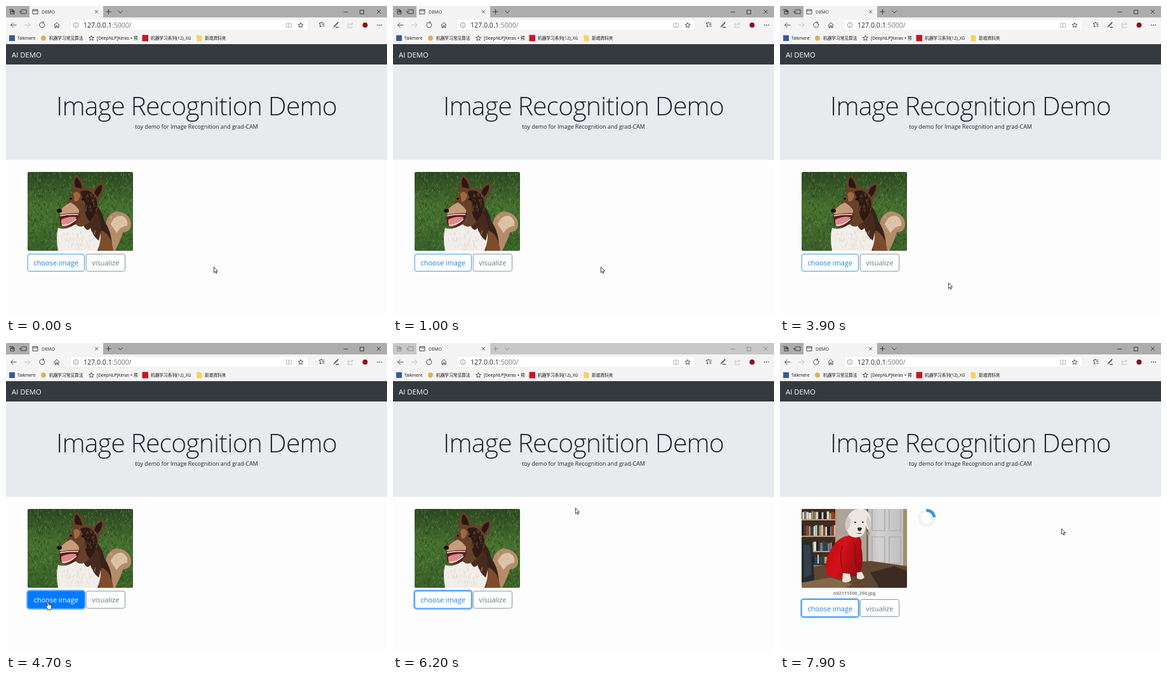
An HTML page for the animation above (8 s loop, 600 by 486 pixels).

```html
<!DOCTYPE html>
<html lang="en">
<head>
<meta charset="utf-8">
<title>DEMO</title>
<style>
  html, body { margin: 0; width: 100%; height: 100%; overflow: hidden; background: #fff; }
  svg { display: block; }
  text { font-family: "Open Sans", "Noto Sans", "Noto Sans CJK SC", sans-serif; fill: #212529; }
  .line { fill: none; stroke: #222; stroke-width: .8; }
  .marks text { font-size: 6.7px; fill: #111; }
  .btn text { font-size: 10.95px; }
  .hide { display: none; }
</style>
</head>
<body>
<svg width="600" height="486" viewBox="0 0 600 486">
  <defs>
    <clipPath id="frame"><rect width="166" height="124" rx="2.5"/></clipPath>
    <linearGradient id="lawn" x2="0" y2="1">
      <stop stop-color="#2c4822"/><stop offset=".45" stop-color="#46702f"/><stop offset="1" stop-color="#395f28"/>
    </linearGradient>
    <linearGradient id="door" x2="1">
      <stop stop-color="#b9b6b2"/><stop offset=".3" stop-color="#d3d2d2"/><stop offset="1" stop-color="#bdbbbb"/>
    </linearGradient>
    <linearGradient id="coat" x2="1" y2=".4">
      <stop stop-color="#b80b12"/><stop offset=".5" stop-color="#d3121a"/><stop offset="1" stop-color="#9c0a10"/>
    </linearGradient>
    <path id="star" d="M0-4 1.1-1.3 4-1.1 1.8.8 2.5 3.7 0 2.1-2.5 3.7-1.8.8-4-1.1-1.1-1.3Z"/>
  </defs>

  <!-- tab strip -->
  <rect id="strip" width="600" height="18.5" fill="#adadad"/>
  <path d="M37 0H153V19H37Z" fill="#f4f4f4"/>
  <g id="caption" class="line">
    <path d="M5.5 6.5V5.5H11V11M7 7.5H13V12.5H7ZM7 9H13"/>
    <path d="M23.5 6H32V12H23.5V10.5M26 9H21.5M23.3 7.3 21.5 9 23.3 10.7"/>
    <path d="M157.5 9H165.500M161.500 5V13M176.500 7.500 180 11 183.500 7.500"/>
    <path d="M531.500 9.500H538.500M557.500 6.500H563.500V12.500H557.500ZM584 6 590 12M590 6 584 12"/>
  </g>
  <path class="line" d="M42 5.500H50V12.500H42ZM42 7.500H50M140 6.500 145 11.500M145 6.500 140 11.500"/>
  <text x="56" y="11.700" font-size="7.100">DEMO</text>

  <!-- toolbar -->
  <rect y="18" width="600" height="42" fill="#f4f4f4"/>
  <rect x="101" y="21" width="375" height="17.500" fill="#fff" stroke="#e2e2e2" stroke-width=".6"/>
  <g class="line">
    <path d="M16.500 30H7.500M11.500 26 7.500 30 11.500 34"/>
    <path d="M29 30H38M34 26 38 30 34 34" stroke="#b5b5b5"/>
    <path d="M60 27.500A4 4 0 1 1 56 26H59.500M57.500 24 59.700 26 57.500 28"/>
    <path d="M76 30 80 26 84 30M77 29.500V34H79V31H81V34H83V29.500"/>
    <g stroke="#777"><circle cx="110" cy="30" r="3.800"/><path d="M110 29.500V32M110 27.700V28.500"/></g>
    <path d="M441.500 27H445.500V33.500H441.500ZM445.500 27H449.500V33.500H445.500Z" stroke="#aaa"/>
    <use href="#star" x="464" y="30"/>
    <path d="M493 27 495.500 27 496.500 25 497.500 27H501.500M493 27 495 29 494.500 33 497 31.500M498 29.500H501.500M498.500 32H501.500"/>
    <path d="M516 33.500Q518 29 523 25.500 523 28 518 32M519 33.500H524" stroke-width="1"/>
    <path d="M541 28H538.500V34H545V32M540.500 31Q541.500 28 546 28M544 26 546.300 28 544 30" stroke="#b5b5b5"/>
  </g>
  <circle cx="565.500" cy="30" r="4" fill="#8a1119"/>
  <path d="M584.500 30H592" stroke="#222" stroke-width="1.300" stroke-dasharray="1.300 1.700"/>
  <text x="122" y="33.500" font-size="10.600" fill="#111">127.0.0.1<tspan fill="#777">:5000/</tspan></text>

  <!-- bookmarks -->
  <g class="marks">
    <rect x="5" y="46" width="9" height="9" fill="#3b5998"/>
    <text x="18" y="53">Talkmere</text>
    <circle cx="59" cy="50.500" r="4" fill="#d8b25c"/>
    <text x="68" y="53">机器学习常见算法</text>
    <use href="#star" x="134.500" y="50.500" class="line"/>
    <text x="143" y="53">[DeepNLP]Keras + 预</text>
    <rect x="214.500" y="45.500" width="9.500" height="10" fill="#c81623"/>
    <text x="228" y="53">机器学习系列(12)_XG</text>
    <path d="M300.500 45.500H304L305 46.500H308.500V55.500H300.500Z" fill="#f6d264"/>
    <text x="313" y="53" style="font-family:'Noto Sans CJK TC','Noto Sans CJK SC',sans-serif">新增資料夾</text>
  </g>

  <!-- page -->
  <rect y="60" width="600" height="32" fill="#343a40"/>
  <text x="9" y="80.500" font-size="11.300" style="fill:#fff">AI DEMO</text>
  <rect y="92" width="600" height="150" fill="#e9eaee"/>
  <text x="300" y="171.500" font-size="41" font-weight="300" letter-spacing="-.9" text-anchor="middle">Image Recognition Demo</text>
  <text x="300" y="193.300" font-size="8.900" text-anchor="middle">toy demo for Image Recognition and grad-CAM</text>
  <rect y="242" width="600" height="244" fill="#fefdfe"/>

  <g transform="translate(34 261)"><g clip-path="url(#frame)">
    <g id="lawnDog">
      <rect width="166" height="124" fill="url(#lawn)"/>
      <g id="grass"></g>
      <path d="M122 92Q122 66 140 62 160 64 163 80 164 94 150 95 146 108 138 124H118Z" fill="#b48c69"/>
      <path d="M131 82Q136 68 149 69 159 74 157 85 148 84 140 96Z" fill="#dcc5aa"/>
      <path d="M98 44Q116 54 121 78 134 96 133 124H56L70 80Z" fill="#38221a"/>
      <path d="M116 92Q132 98 135 124H112Z" fill="#7d4c2d"/>
      <path d="M48 88Q60 92 72 84 88 78 98 62 106 64 112 82 119 102 110 124H48Q44 102 48 88Z" fill="#f2eee9"/>
      <path d="M88 84Q100 78 103 64L110 66Q120 82 112 108 102 100 99 88 94 96 88 84Z" fill="#482a1d"/>
      <path d="M71 32Q68 16 76 4 86 10 90 25 97 24 103 29 108 17 120 17 123 31 112 42 112 64 98 78 86 90 78 84L60 70 48 66Q52 55 62 50 66 40 71 32Z" fill="#67402a"/>
      <path d="M75 24Q72 14 77 8 84 14 86 26ZM105 34Q108 22 117 20 119 30 109 40Z" fill="#2b1812"/>
      <path d="M83 31Q99 24 108 42 114 60 98 78 88 68 91 51Z" fill="#2c1a14"/>
      <path d="M49 64Q56 53 68 48 76 52 81 60 82 67 74 72L56 70Z" fill="#c79c79"/>
      <path d="M72 34Q78 28 83 36 82 46 74 47Z" fill="#a2683d"/>
      <path d="M50 68Q64 64 82 65 81 79 69 85 57 90 51 81Z" fill="#551e20"/>
      <path d="M53 75Q64 69 77 71 71 84 58 86 52 85 53 75Z" fill="#df8889"/>
      <path d="M51 69Q65 66 80 67M54 84Q67 84 77 74" fill="none" stroke="#f6ece5" stroke-width="1.700"/>
      <ellipse cx="50" cy="61" rx="4" ry="3.300" fill="#17110f"/>
      <ellipse cx="68" cy="42" rx="2" ry="1.600" fill="#140d0a"/>
      <ellipse cx="87" cy="43" rx="2.400" ry="1.700" fill="#140d0a"/>
      <g id="fur"></g>
    </g>
    <g id="roomDog" class="hide">
      <rect width="166" height="124" fill="#8d7b67"/>
      <path d="M54 0H106V92H54Z" fill="#aca49a"/>
      <path d="M102 0H166V92H102Z" fill="url(#door)"/>
      <path d="M111 0V34H131V0M138 0V34H156V0M111 44V84H131V44ZM138 44V86H156V44Z" fill="none" stroke="#a5a5a8" stroke-width="1.200"/>
      <path d="M160 0H166V96H160Z" fill="#a78c69"/>
      <path d="M102 0H105V84H102Z" fill="#77695a"/>
      <circle cx="105" cy="39" r="2.200" fill="#bb9752"/>
      <rect width="54" height="88" fill="#3e2b20"/>
      <g id="books"></g>
      <path d="M0 17H54M0 43H54M0 67H54" stroke="#bd9f80" stroke-width="2"/>
      <path d="M53 0H56V84H53Z" fill="#b79b7c"/>
      <path d="M0 94 60 84 110 82 166 90V124H0Z" fill="#604733"/>
      <path d="M0 50 17 52 20 112 0 117Z" fill="#232a30"/>
      <path d="M3 56 14 57 16 104 4 108Z" fill="#35404a"/>
      <path d="M108 100 145 90 166 97V124H122Z" fill="#3b2b22"/>
      <path d="M0 116 45 108 80 118 70 124H0Z" fill="#87674b"/>
      <path d="M74 42Q58 44 47 62 34 84 40 104 54 112 72 108L92 104Q99 80 94 60 96 48 90 43Z" fill="url(#coat)"/>
      <path d="M64 58Q58 82 68 106M84 56Q83 78 88 102" fill="none" stroke="#8d0a10" stroke-width="1.500"/>
      <path d="M65 101 76 102 78 112Q72 118 64 114ZM87 100 95 99 99 108Q94 113 87 109Z" fill="#ebe5dc"/>
      <path d="M73 11Q80-2 97 0 108 4 109 18 110 29 105 33 101 29 101 23 101 38 95 42 84 48 76 42 71 36 70 27Z" fill="#ece8e1"/>
      <path d="M73 11Q66 20 70 34 77 31 78 17ZM104 10Q111 20 108 33 103 29 102 19Z" fill="#d3cabe"/>
      <path d="M83 20H86V22H83ZM95 20H98V22H95ZM88 30Q91 28 95 30 94 35 91 35 88 34 88 30ZM86 38Q91 40 96 38" fill="#2b2625"/>
    </g>
  </g></g>

  <text id="file" class="hide" x="117" y="396" font-size="7.300" font-weight="700" text-anchor="middle" style="fill:#85868a">n02111500_250.jpg</text>
  <g id="spinner" class="hide" fill="none" stroke-width="4.700">
    <circle r="11.650" stroke="#f3f3f3"/>
    <path d="M-8.240-8.240A11.650 11.650 0 0 1 8.240-8.240" stroke="#3498db"/>
  </g>

  <g id="buttons" class="btn">
    <rect id="ring" class="hide" x="33" y="389" width="91.500" height="29.500" rx="4" fill="none" stroke="#80bdff" stroke-width="2"/>
    <rect id="choose" x="34.200" y="390.200" width="89.200" height="27" rx="3" fill="#fff" stroke="#2289d8" stroke-width=".9"/>
    <text id="label" x="78.800" y="408.300" text-anchor="middle">choose image</text>
    <rect x="126.200" y="390.200" width="61.300" height="27" rx="3" fill="#fff" stroke="#7d868d" stroke-width=".9"/>
    <text x="156.800" y="408.300" text-anchor="middle" style="fill:#6c757d">visualize</text>
  </g>

  <g id="cursor" fill="#fff" stroke="#111" stroke-width=".8" stroke-linejoin="round">
    <path id="arrow" d="M.4.4V9.400L2.400 7.500 3.700 10.600 5.100 10 3.800 7H6.600Z"/>
    <path id="hand" d="M-1 1V6.800L-2.400 5.900Q-3.400 6-3 7.200L-.6 11.200V12.600H5V11Q6 9 5.900 6.200 5.600 5.200 4.600 5.600 4.300 4.700 3.200 5 2.600 4.200 1.100 4.400V1Q0-.6-1 1Z"/>
  </g>
</svg>
<script>
const LOOP = 8000, STEP = 100;
const CLICK = 4600, DIALOG = 4800, LEAVE = 5800, PICKED = 7800;
const $ = id => document.getElementById(id);

let seed = 7;
const rnd = (a = 0, b = 1) => {
  seed = (seed * 16807) % 2147483647;
  return a + (b - a) * seed / 2147483647;
};

// Scatters short strokes of one colour over a box.
function strokes(host, color, count, [x0, y0, x1, y1], dx, dy, width = .7) {
  let d = '';
  for (let i = 0; i < count; i++) {
    d += `M${rnd(x0, x1).toFixed(1)} ${rnd(y0, y1).toFixed(1)}l${rnd(-dx, dx).toFixed(1)} ${rnd(-dy, -dy / 3).toFixed(1)}`;
  }
  host.insertAdjacentHTML('beforeend', `<path d="${d}" fill="none" stroke="${color}" stroke-width="${width}"/>`);
}

const lawn = [0, 0, 166, 126];
strokes($('grass'), '#213a19', 520, lawn, 3, 5);
strokes($('grass'), '#5f8d42', 430, lawn, 3, 5);
strokes($('grass'), '#83a95f', 150, [0, 25, 166, 126], 3, 4, .5);
strokes($('fur'), '#9b6845', 38, [91, 36, 108, 64], 1.5, 5, .5);
strokes($('fur'), '#d8d0c7', 60, [52, 96, 108, 124], 1.5, 7, .6);
strokes($('fur'), '#d2ad86', 30, [130, 72, 154, 90], 3, 4, .6);

const spines = ['#a33b2b', '#d6d0bd', '#2e4257', '#202024', '#b5a04c', '#777d82', '#e2dfd7'];
[[3, 16], [25, 42], [50, 66], [72, 86]].forEach(([top, base]) => {
  for (let x = 1; x < 52;) {
    const w = rnd(2, 4.5), y = top + rnd(0, 4);
    const color = spines[Math.floor(rnd(0, spines.length))];
    $('books').insertAdjacentHTML('beforeend',
      `<rect x="${x}" y="${y}" width="${w}" height="${base - y}" fill="${color}"/>`);
    x += w + .4;
  }
});

// Pointer positions: time, x, y
const path = [
  [0, 327, 410], [3600, 327, 410], [3800, 300, 426], [4000, 230, 444],
  [4200, 150, 448], [4400, 86, 425], [4500, 69, 410], [4600, 66, 407],
  [5700, 66, 407], [5900, 135, 352], [6100, 265, 272], [6200, 287, 259],
  [6400, 288, 257], [6600, 271, 246], [6900, 271, 246], [7100, 320, 262],
  [7400, 432, 289], [7500, 447, 291.500], [7700, 447, 291.500], [7800, 443, 291.500], [8000, 443, 291.500]
];

function pointAt(t) {
  const i = path.findIndex(p => p[0] > t);
  const [t0, x0, y0] = path[i - 1], [t1, x1, y1] = path[i];
  const k = (t - t0) / (t1 - t0);
  return [x0 + (x1 - x0) * k, y0 + (y1 - y0) * k];
}

const show = (id, on) => $(id).classList.toggle('hide', !on);

function render(t) {
  const hover = t >= 4500 && t < LEAVE;
  const active = t < DIALOG || t >= PICKED;
  const picked = t >= PICKED;
  const hand = hover || (t >= 7600 && t < PICKED);

  $('strip').setAttribute('fill', active ? '#adadad' : '#c8c8c8');
  $('caption').style.stroke = active ? '#222' : '#808080';

  show('ring', t >= CLICK);
  $('choose').setAttribute('fill', hover ? (t < CLICK ? '#55a7ff' : '#007bff') : '#fff');
  $('choose').setAttribute('stroke', t >= CLICK ? '#007bff' : '#2289d8');
  $('label').style.fill = hover ? '#fff' : '#1c7fe6';

  show('lawnDog', !picked);
  show('roomDog', picked);
  show('file', picked);
  show('spinner', picked);
  $('spinner').setAttribute('transform', `translate(231.300 275) rotate(${40 + (t - 7900) * .18})`);
  $('buttons').setAttribute('transform', `translate(0 ${picked ? 13.300 : 0})`);

  const [x, y] = pointAt(t);
  $('cursor').setAttribute('transform', `translate(${x} ${y})`);
  show('arrow', !hand);
  show('hand', hand);
}

const start = performance.now();
function tick(now) {
  const t = Math.max(0, now - start) % LOOP;
  render(Math.floor(t / STEP) * STEP);
  requestAnimationFrame(tick);
}
render(0);
requestAnimationFrame(tick);
</script>
</body>
</html>
```
